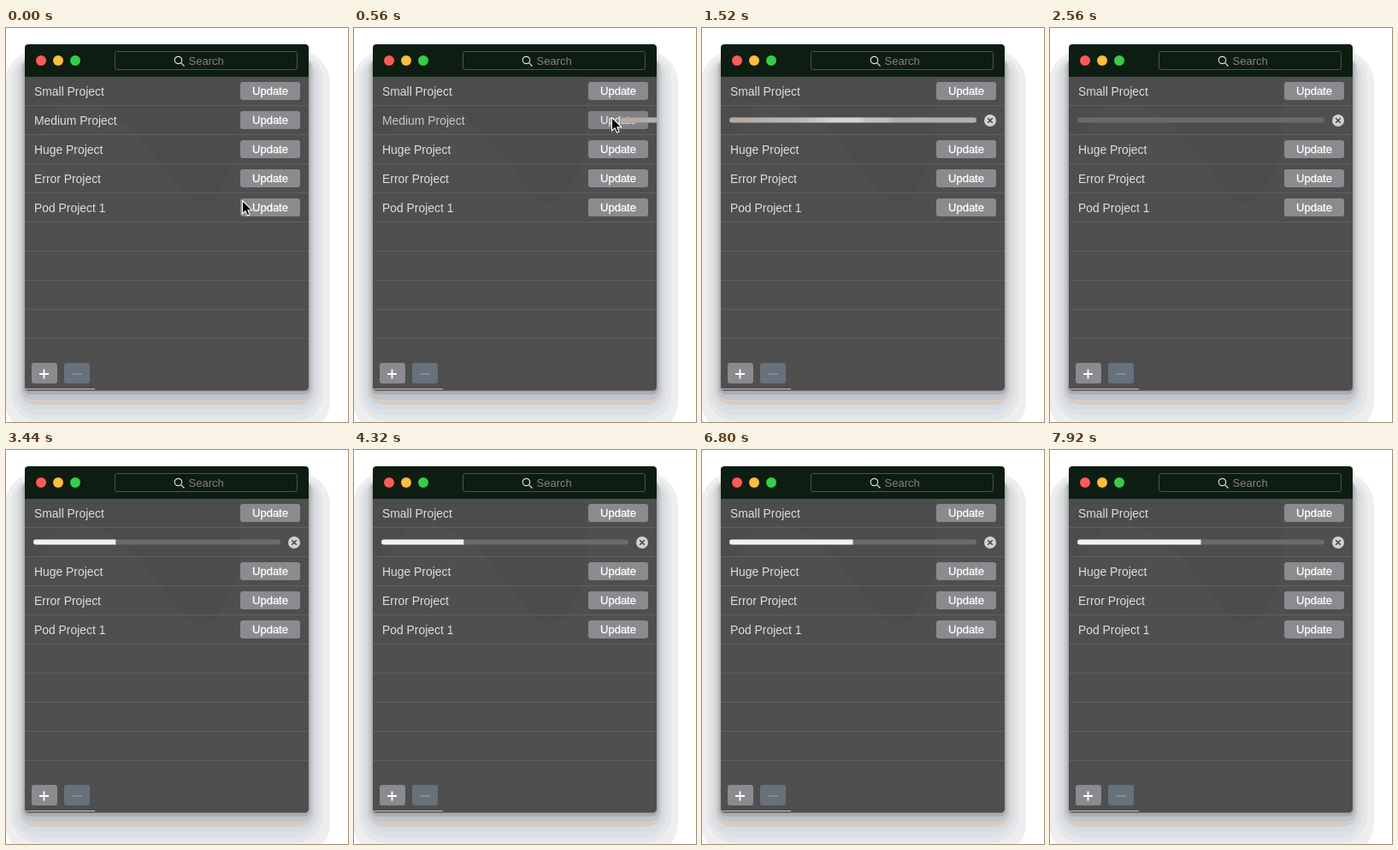
Animation of 400x460 px, one loop 8 s. Source, as an HTML page:

```html
<!DOCTYPE html>
<html lang="en">
<head>
<meta charset="utf-8">
<title>Project updater</title>
<style>
  html, body { margin: 0; width: 100%; height: 100%; overflow: hidden; background: #fff; }
  svg { display: block; width: 400px; height: 460px; }
  text { font-family: "Liberation Sans", Arial, sans-serif; font-size: 13px; }
  .label { font-size: 13.9px; fill: #dedede; }
  .button rect { fill: #898b8e; }
  .button text { fill: #fff; stroke: #fff; stroke-width: .3; text-anchor: middle; }
</style>
</head>
<body>
<svg viewBox="0 0 400 460">
  <defs>
    <clipPath id="window"><rect x="22" y="19" width="332" height="404.5" rx="4.5"/></clipPath>
    <linearGradient id="busyFill">
      <stop offset="0" stop-color="#b7a89c"/>
      <stop offset=".08" stop-color="#b5aaa2"/>
      <stop offset=".1" stop-color="#acb0b3"/>
      <stop offset=".3" stop-color="#bababa"/>
      <stop offset=".42" stop-color="#d0d3d8"/>
      <stop offset=".53" stop-color="#d0d3d8"/>
      <stop offset=".55" stop-color="#c3c0bc"/>
      <stop offset=".64" stop-color="#c0bebc"/>
      <stop offset=".66" stop-color="#adb0b2"/>
      <stop offset="1" stop-color="#b0b0b0"/>
    </linearGradient>
  </defs>

  <g id="shadow"></g>

  <g clip-path="url(#window)">
    <rect x="22" y="19" width="332" height="405" fill="#4f4f4f"/>
    <path d="M22 57H272V145Q262 172 246 196Q229 210 211 196Q190 170 168 142Q145 110 110 92Q82 82 64 91L40 124H22Z" fill="#4c4c4c"/>
    <rect x="22" y="19" width="332" height="38" fill="#0e1d11"/>
    <circle cx="41" cy="38" r="6" fill="#fc5b57"/>
    <circle cx="61" cy="38" r="6" fill="#fdbd3f"/>
    <circle cx="81" cy="38" r="6" fill="#37cd4b"/>
    <rect x="127.5" y="27.5" width="213" height="21" rx="2.5" fill="none" stroke="#4b554d"/>
    <g fill="none" stroke="#dcdcdc" stroke-width="1.2">
      <circle cx="201.5" cy="37.5" r="4.2"/>
      <path d="M204.6 40.6L208.5 44.5"/>
    </g>
    <text x="213.5" y="43" fill="#867f86">Search</text>

    <g id="rows"></g>

    <g id="progress">
      <rect x="32" y="104.5" width="289" height="6" rx="3" fill="#6a6a6a"/>
      <path id="bar" fill="#f0f0f0"/>
      <rect id="busy" x="32" y="104.5" width="289" height="6" rx="3" fill="url(#busyFill)"/>
      <circle cx="337" cy="108" r="7" fill="#d2d2d2"/>
      <path d="M334.2 105.2L339.8 110.8M339.8 105.2L334.2 110.8" stroke="#444" stroke-width="1.5"/>
    </g>

    <rect x="30" y="391" width="30" height="24" rx="3" fill="#898b8e"/>
    <path d="M39 404H50M44.5 398.5V409.5" stroke="#fff" stroke-width="1.8"/>
    <rect x="68" y="391" width="30" height="24" rx="3" fill="#66717c"/>
    <path d="M77.5 404H88.5" stroke="#8d959c" stroke-width="1.6"/>
    <path d="M22 421.5H104" stroke="#c4c4c4"/>
  </g>

  <path id="cursor" d="M0 0V15.5L3.6 12.2L6 17.6L8.6 16.5L6.3 11.2H11.2Z" fill="#000" stroke="#fff" stroke-width="1.1" stroke-linejoin="round"/>
</svg>
<script>
const $ = id => document.getElementById(id);
const LOOP = 8000, TICK = 80, BAR_X = 32, BAR_WIDTH = 289;

// Shadow bands, outermost first: left, top, right, bottom, radius, colour
$('shadow').innerHTML = [
  [-1, 26, 379, 474, 38, '#eeeeee'],
  [6, 29, 371, 459, 32, '#e5e6e7'],
  [10, 32, 366, 452, 27, '#dbe1e6'],
  [13, 33, 363, 446, 22, '#d5dce2'],
  [16, 34, 360, 440, 18, '#d6cdc6'],
  [18, 35, 358, 434, 13, '#bfc5cc'],
  [20, 36, 356, 428, 8, '#adadb0']
].map(([x, y, right, bottom, r, fill]) =>
  `<rect x="${x}" y="${y}" width="${right - x}" height="${bottom - y}" rx="${r}" fill="${fill}"/>`).join('');

const names = ['Small Project', 'Medium Project', 'Huge Project', 'Error Project', 'Pod Project 1'];
const row = (name, i) => `<g id="row${i}" transform="translate(0 ${i * 34})">
  <text class="label" x="33" y="79">${name}</text>
  <g class="button"><rect x="274" y="63" width="70" height="21" rx="3"/><text x="309" y="78">Update</text></g></g>`;
const lines = Array.from({ length: 9 }, (_, i) => `M22 ${90.5 + i * 34}H354`).join('');
$('rows').innerHTML = `<path d="${lines}" stroke="#606060"/>` + names.map(row).join('');

const span = (t, from, to) => Math.min(1, Math.max(0, (t - from) / (to - from)));
const ease = u => (1 - Math.cos(Math.PI * u)) / 2;

function draw(t) {
  const slide = ease(span(t, 495, 745));
  $('row1').setAttribute('opacity', 1 - slide);
  $('progress').setAttribute('transform', `translate(${332 * (1 - slide)} 0)`);
  $('busy').setAttribute('opacity', 1 - span(t, 1920, 2080));

  const done = [3040, 3440, 6480].filter(start => t >= start).length / 6;
  const end = BAR_X + BAR_WIDTH * done;
  $('bar').setAttribute('d', done ? `M${end} 104.5H35a3 3 0 0 0 0 6H${end}Z` : '');

  const approach = ease(span(t, 0, 320));
  const leave = span(t, 720, 1040) ** 2;
  $('cursor').setAttribute('transform',
    `translate(${276.5 + 25 * approach + 110 * leave} ${201.5 - 97 * approach + 50 * leave})`);
}

const start = performance.now();
function frame() {
  const t = (performance.now() - start) % LOOP;
  draw(Math.floor(t / TICK) * TICK);
  requestAnimationFrame(frame);
}
frame();
</script>
</body>
</html>
```
